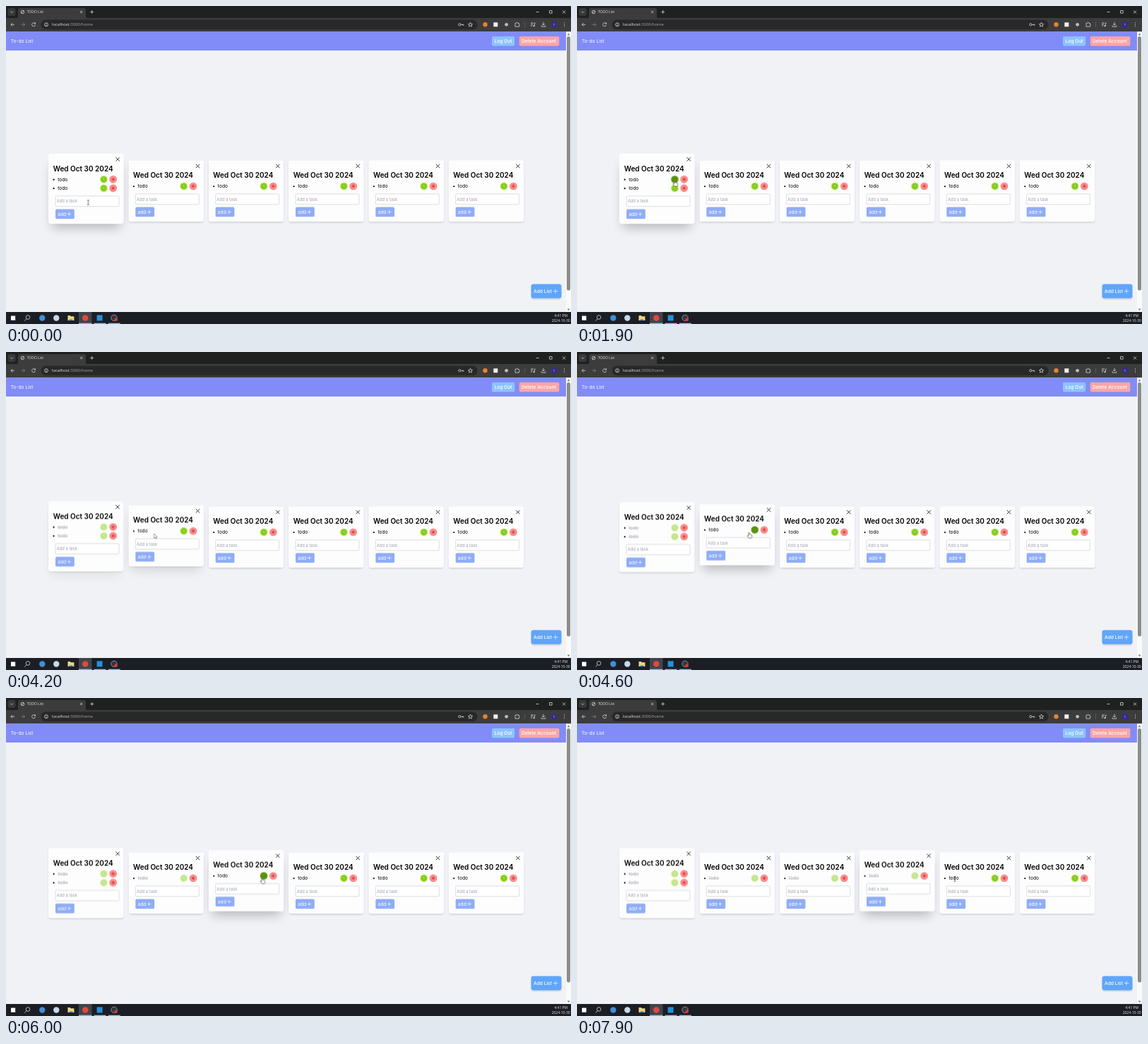
Animation, 800 px wide and 450 px high, one loop 8000 ms. Source, as an HTML page:

```html
<!DOCTYPE html>
<html lang="en">
<head>
<meta charset="utf-8">
<title>TODO List</title>
<style>
  html, body { margin: 0; width: 100%; height: 100%; overflow: hidden; background: #f1f2f6; }
  svg { display: block; width: 100vw; height: 100vh; }
  text { font: 6.67px Inter, sans-serif; white-space: pre; }
  .ui { font: 5px "Open Sans", sans-serif; fill: #e6e6e6; }
  .light { fill: #fff; font-weight: 500; }
  .title { font-size: 10px; font-weight: 600; }
  .hint { font-size: 5.83px; fill: #9ca3af; }
  .line { fill: none; stroke: #d8d8d8; stroke-width: .8; }
  .plus { fill: none; stroke: #fff; stroke-width: .65; }
  .low { filter: blur(1.3px); opacity: .16; }
  .high { filter: blur(8px); opacity: 0; }
  .mark { fill: none; stroke-width: .65; }
</style>
</head>
<body>
<svg viewBox="0 0 800 450">
  <rect width="800" height="450" fill="#f1f2f6"/>

  <!-- Browser window -->
  <rect width="800" height="18" fill="#1f2020"/>
  <rect x="2.5" y="3" width="11" height="11" rx="3" fill="#38393a"/>
  <path class="line" d="M6.3 7.7l1.8 1.8 1.8-1.8"/>
  <path d="M14 17.5q3 0 3-3V6q0-3 3-3h90q3 0 3 3v8.5q0 3 3 3z" fill="#3c3c3c"/>
  <circle class="line" cx="23.5" cy="8.5" r="2.3"/>
  <path class="line" d="M22 10l3-3"/>
  <text class="ui" x="29.7" y="10.3">TODO List</text>
  <path class="line" d="M105 6.8l3.2 3.2m0-3.2l-3.2 3.2M119.2 8.4h5m-2.5-2.5v5"/>
  <path class="line" d="M750.5 8.5h4M769.5 6.5h3.6v3.6h-3.6zM788 6.5l4 4m0-4l-4 4"/>

  <rect y="17" width="800" height="19.5" fill="#3c3c3c"/>
  <path class="line" d="M12 26.3H7m2.3-2.3L7 26.3l2.3 2.3"/>
  <path class="line" d="M21.5 26.3h5m-2.3-2.3l2.3 2.3-2.3 2.3" opacity=".45"/>
  <path class="line" d="M41.3 25a2.5 2.5 0 1 0 .2 2M41.6 23.2v2h-2"/>
  <rect x="49.5" y="19.5" width="618" height="13.7" rx="6.8" fill="#282828"/>
  <circle class="line" cx="57" cy="26.3" r="2.5" stroke-width=".6"/>
  <path class="line" d="M57 25.8v2m0-3.2v.6"/>
  <text class="ui" x="65" y="28.4" style="font-size:5.9px">localhost<tspan fill="#a5a5a5">:3000/home</tspan></text>
  <circle class="line" cx="642.3" cy="26.3" r="1.6"/>
  <path class="line" d="M644 26.3h4v1.5m-1.8-1.5v1.3"/>
  <path class="line" d="M657.5 23.2l.9 2.1 2.2.2-1.7 1.5.5 2.2-1.9-1.2-1.9 1.2.5-2.2-1.7-1.5 2.2-.2z"/>
  <circle cx="678.5" cy="26.3" r="3.2" fill="#e5832d"/>
  <rect x="690.3" y="23.3" width="6" height="6" fill="#f0f0f0"/>
  <circle cx="708.6" cy="26.3" r="2.4" fill="#bdbdbd"/>
  <path class="line" d="M721 24.3h1.7a1 1 0 0 1 2 0h1.6v1.6a1 1 0 0 1 0 2v1.3H721z"/>
  <path d="M734.5 22.5v7.5" stroke="#696969" stroke-width=".6"/>
  <path class="line" d="M743 24h4m-4 2h3m-3 2h2m3.3.5v-4.3h1.5"/>
  <circle cx="747.4" cy="28.3" r="1" fill="#ddd"/>
  <path class="line" d="M761 22.8v4.3m-1.9-1.8l1.9 1.8 1.9-1.8M758.2 27.5v1.7h5.6v-1.7"/>
  <circle cx="776" cy="26.3" r="4.2" fill="#33299a"/>
  <text class="ui" x="776" y="27.8" text-anchor="middle" style="font-size:4.5px">t</text>
  <path d="M790.5 23.4v.9m0 1.5v.9m0 1.5v.9" stroke="#ddd" stroke-width="1"/>

  <!-- Page header -->
  <rect y="36.3" width="793" height="26.7" fill="#818cf8"/>
  <text class="light" x="6.7" y="52.1" style="font-weight:400">To-do List</text>
  <rect x="688" y="43" width="32.2" height="13.4" rx="1.8" fill="#8dc3fd"/>
  <text class="light" x="691.4" y="52.1">Log Out</text>
  <rect x="726.7" y="43" width="56.6" height="13.4" rx="1.8" fill="#fca5a5"/>
  <text class="light" x="730" y="52.1">Delete Account</text>

  <!-- Scrollbar -->
  <rect x="793" y="36.3" width="7" height="397" fill="#fafafa"/>
  <rect x="794" y="43" width="5" height="359.5" rx="2.5" fill="#8c8c8c"/>
  <path d="M794.6 41.2l1.9-2.6 1.9 2.6zM794.6 428.4l1.9 2.6 1.9-2.6z" fill="#777"/>

  <g id="cards"></g>

  <rect class="low" x="744" y="395.5" width="42" height="19.5" rx="3.3"/>
  <rect x="743.5" y="393.5" width="43" height="20" rx="3.3" fill="#60a5fa"/>
  <text class="light" x="747" y="406">Add List</text>
  <path class="plus" d="M774.7 403.5h6.6m-3.3-3.3v6.6"/>

  <!-- Taskbar -->
  <rect y="433" width="800" height="17" fill="#1c1e25"/>
  <rect x="103" y="433" width="18.5" height="17" fill="#41444b"/>
  <rect x="7" y="438.5" width="6.2" height="6.2" fill="#fff"/>
  <circle class="line" cx="31" cy="440.5" r="2.8"/>
  <path class="line" d="M29 442.7l-2.7 2.9"/>
  <circle cx="51.3" cy="441.5" r="4.2" fill="#3f8fd8"/>
  <circle cx="71.3" cy="441.5" r="4.2" fill="#c9d8e8"/>
  <path d="M87.5 438h3.3l1 1.2h4.6v5.8h-8.9z" fill="#f5d778"/>
  <path d="M89.5 443h5v2h-5z" fill="#4b9fdd"/>
  <circle cx="112.3" cy="441.5" r="4.3" fill="#e0493c"/>
  <rect x="128.6" y="437.4" width="8" height="8" fill="#2590dc"/>
  <circle cx="153" cy="441.3" r="4.2" fill="#34353b" stroke="#ccc" stroke-width=".6"/>
  <circle cx="155.7" cy="443.8" r="2.3" fill="#e53232"/>
  <path d="M103 449.4h18.5m3 0h17m3.3 0h17" stroke="#8fc5ee" stroke-width="1.1"/>
  <text class="ui" x="785.7" y="439.5" text-anchor="middle">4:41 PM</text>
  <text class="ui" x="785.7" y="447.3" text-anchor="middle">2024-10-30</text>

  <g id="cursor">
    <path id="beam" d="M-1.4-3.4Q0-3.4 0-2.6Q0-3.4 1.4-3.4M0-2.6V2.7M-1.4 3.4Q0 3.4 0 2.6Q0 3.4 1.4 3.4" fill="none" stroke="#111" stroke-width=".6"/>
    <path id="arrow" d="M0 0V6.7L1.5 5.3 2.5 7.6 3.5 7.2 2.5 4.9H4.6Z" fill="#fff" stroke="#333" stroke-width=".45"/>
    <path id="hand" d="M-.7.6Q0-.5.7.6V3Q1.6 2.5 2 3.3 2.8 2.8 3.2 3.7 4.2 3.3 4.2 4.5V6Q4.2 7 3.4 8.2H-.2L-2.3 5.2Q-2.5 4.1-1.5 4.4L-.7 5.1Z" fill="#fff" stroke="#111" stroke-width=".5"/>
  </g>
</svg>

<script>
const LOOP = 8000, LIFT = 300, ROW = 12.5;
const CENTER = 261.9, CARD_W = 106.67, PITCH = 113.33;
const LIME = '#a3e635', DARK_LIME = '#5f9b10';

// done: click time; hover: spans over the check button; up: span in which the card is raised
const cards = [
  { up: [-LIFT, 4070], rows: [
    { done: 3100, hover: [[1050, 3200]] },
    { done: 3600, hover: [[960, 1050], [3250, 3850]] } ] },
  { up: [4095, 5180], rows: [{ done: 4850, hover: [[4600, 5060]] }] },
  { up: [5200, 6660], rows: [{ done: 6400, hover: [[5900, 6550]] }] },
  { up: [6715, LOOP], rows: [{ done: 7250, hover: [[7000, 7650]] }] },
  { rows: [{}] },
  { rows: [{}] }
];

const $ = id => document.getElementById(id);

function track(el, frames, easing = 'steps(1)') {
  const all = [...frames, [LOOP, frames.at(-1)[1]]];
  el.animate(all.map(([time, style]) => ({ offset: time / LOOP, easing, ...style })),
    { duration: LOOP, iterations: Infinity });
}

const rowMarkup = (row, i) => `
  <g class="row" transform="translate(0 ${36.4 + i * ROW})">
    <circle cx="7.6" cy=".3" r="1.1"/>
    <text class="todo" x="13.2" y="2.4">todo</text>
    <path class="strike" d="M13 .3h14.7" stroke="#9ca3af" stroke-width=".5" opacity="0"/>
    <g class="check" transform="translate(78.4 0)">
      <circle class="disc" r="5.3" fill="${LIME}"/>
      <g class="mark" stroke="#4d7c0f"><circle r="3.1"/><path d="M-1.4.1l1 1 1.8-2"/></g>
    </g>
    <g transform="translate(91.7 0)">
      <circle r="5.3" fill="#f87171"/>
      <circle class="mark" r="3.9" stroke="#fdd0d0"/>
      <path class="mark" d="M-1.2-1.2l2.4 2.4m0-2.4l-2.4 2.4" stroke="#8f1f1f"/>
    </g>
  </g>`;

function cardMarkup({ rows }, i) {
  const extra = (rows.length - 1) * ROW, height = 86.7 + extra;
  return `<g transform="translate(${60 + i * PITCH} ${CENTER - height / 2})"><g class="card">
    <rect class="high" x="5" y="15.4" width="${CARD_W - 10}" height="${height - 10}" rx="3"/>
    <rect class="low" x=".4" y="2" width="${CARD_W - .8}" height="${height - .8}" rx="3.3"/>
    <rect width="${CARD_W}" height="${height}" rx="3.3" fill="#fdfdfe"/>
    <path d="M95.5 5.3l5.4 5.4m0-5.4l-5.4 5.4" stroke="#111" stroke-width=".85"/>
    <text class="title" x="6.7" y="24.8">Wed Oct 30 2024</text>
    ${rows.map(rowMarkup).join('')}
    <g transform="translate(10 ${extra})">
      <rect y="47.4" width="90" height="14.8" rx="1.7" fill="#fff" stroke="#c6c8cd" stroke-width=".6"/>
      <text class="hint" x="1.7" y="57">Add a task</text>
      <rect y="66" width="26.8" height="13.8" rx="1.7" fill="#8fadf6"/>
      <text class="light" x="3.2" y="75.4" style="font-weight:400">add</text>
      <path class="plus" d="M16.7 73h5.4m-2.7-2.7v5.4"/>
    </g>
  </g></g>`;
}

function animateLift(card, [from, to]) {
  const span = (low, high) => {
    const frames = from > 0 ? [[0, low], [from, low]] : [];
    frames.push([Math.max(0, from + LIFT), high]);
    if (to < LOOP) frames.push([to, high], [to + LIFT, low]);
    return frames;
  };
  const ease = 'cubic-bezier(.4,0,.2,1)';
  track(card, span({ transform: 'translateY(0px)' }, { transform: 'translateY(-3.33px)' }), ease);
  track(card.querySelector('.high'), span({ opacity: 0 }, { opacity: .25 }), ease);
  track(card.querySelector('.low'), span({ opacity: .16 }, { opacity: 0 }), ease);
}

function animateRow(el, { done, hover }) {
  const part = name => el.querySelector(name);
  const flip = (name, before, after) => track(part(name), [[0, before], [done, after]]);
  flip('.todo', { fill: '#000' }, { fill: '#a6abb5' });
  flip('.strike', { opacity: 0 }, { opacity: 1 });
  flip('.check', { opacity: 1 }, { opacity: .5 });
  track(part('.disc'), [[0, { fill: LIME }], ...hover.flatMap(([start, end]) =>
    [[start, { fill: DARK_LIME }], [end, { fill: LIME }]])]);
}

$('cards').innerHTML = cards.map(cardMarkup).join('');
document.querySelectorAll('.card').forEach((el, i) => {
  if (!cards[i].up) return;
  animateLift(el, cards[i].up);
  el.querySelectorAll('.row').forEach((row, k) => animateRow(row, cards[i].rows[k]));
});

const path = [
  [0, 116.5, 278], [350, 82, 292], [450, 79, 293], [700, 112, 275], [950, 137, 258],
  [1100, 138.3, 247], [3100, 138.3, 247], [3400, 138.5, 258], [3650, 138.5, 258],
  [4000, 156, 259], [4200, 209.5, 257], [4450, 232, 257], [4700, 251, 254],
  [4980, 251, 254], [5200, 291, 254.5], [5600, 340, 257], [5750, 340, 257],
  [5980, 362.5, 254.5], [6450, 362.5, 254.5], [6660, 393, 255], [6900, 466, 254.5],
  [7100, 478, 253], [7500, 478, 253], [7800, 505, 255], [7900, 535, 256]
];
track($('cursor'), path.map(([t, x, y]) => [t, { transform: `translate(${x}px, ${y}px)` }]), 'linear');

const shapes = [
  [0, 'beam'], [150, 'arrow'], [250, 'hand'], [530, 'arrow'], [600, 'beam'], [850, 'arrow'],
  [950, 'hand'], [3850, 'arrow'], [4600, 'hand'], [5060, 'arrow'], [5900, 'hand'],
  [6550, 'arrow'], [7000, 'hand'], [7650, 'arrow'], [7850, 'beam']
];
for (const id of ['beam', 'arrow', 'hand'])
  track($(id), shapes.map(([t, shape]) => [t, { opacity: +(shape === id) }]));
</script>
</body>
</html>
```
